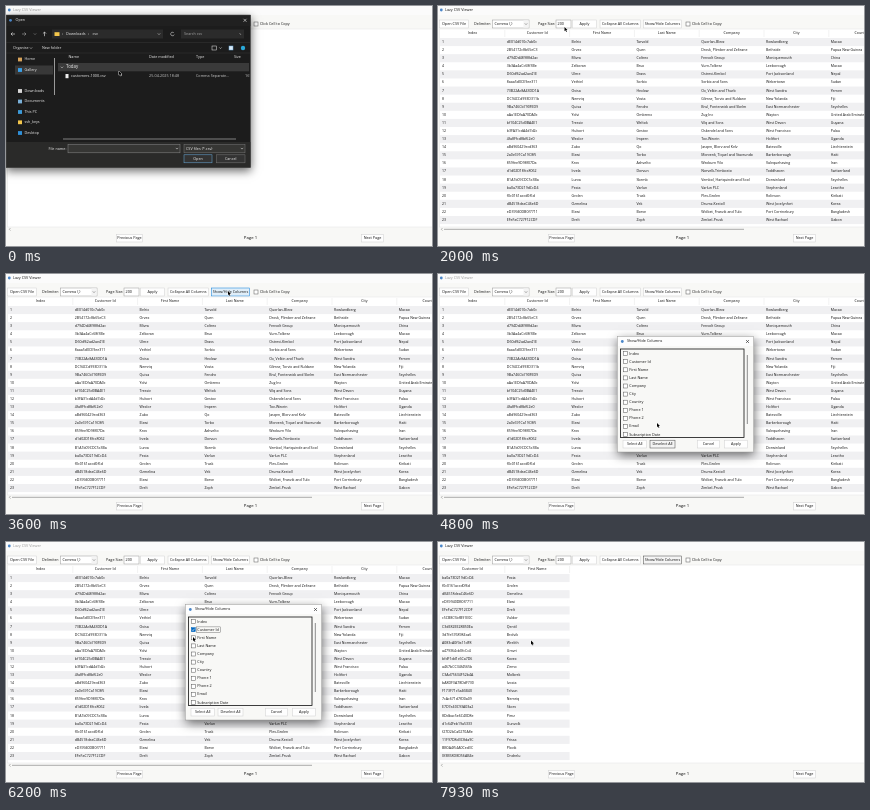
An HTML page with a canvas that plays this animation: 426 px wide and 240 px high, repeating every 8 s.

```html
<!DOCTYPE html>
<html lang="en">
<head>
<meta charset="utf-8">
<title>Lazy CSV Viewer</title>
<style>
html, body { margin: 0; width: 100%; height: 100%; overflow: hidden; background: #fff; }
canvas { display: block; width: 426px; height: 240px; }
</style>
</head>
<body>
<canvas id="stage"></canvas>
<script>
const W = 426, H = 240, LOOP = 8000, STEP = 200 / 3;
const canvas = document.getElementById('stage');
const ctx = canvas.getContext('2d');
const dpr = window.devicePixelRatio || 1;
canvas.width = W * dpr;
canvas.height = H * dpr;

const BLUE = '#0078d7', LINE = '#cfcfcf', WINDOW = '#f8f8f6', STRIPE = '#f0f0f2';
const ROW = 8.09, VISIBLE = 23;

// ---- data ----
const HEAD = ['Index', 'Customer Id', 'First Name', 'Last Name', 'Company', 'City', 'Country',
  'Phone 1', 'Phone 2', 'Email', 'Subscription Date', 'Website'];

const IDS = `dE014d010c7ab0c 2B54172c8b65eC3 d794Dd48988d2ac 3b3Aa4aCc68f3Be D60df62ad2ae41E
8aaa5d0CE9ee311 73B22Ac8A43DD1A DC94CCd993D311b 9Ba746Cb790FED9 aAa1EDfaA70DA0c bf104C25d0BA4E1
b3FA31cdA4d7d2c 4fa8Ffcd8bf62e0 aBd960429ecd363 2a0c691Ca19C8f5 859fee9D98f07Da d1d02D18fcc8062
B1A1b09CDC5c3Ba ba0a73D219dCcD4 f0c0161accd0f6d dB4518deaC46e6D eD39940DB0f7711 EFeFaC727F12CDF
c5CB8C5bfB91E0C C3dE82EE28B50Ea 3d7fe5768984ca6 A083cA0f9a11dF8 a479364cb0fcCc4 bfdF1dd1c6Ca7D6
a467bCC34f4565b C3Ad75634F52b4A bA8DF3A78DdF730 F173F71c5a46B40 7cAc671d7fD0a09 E7D7e40C93A03a2
8Ddbac5e6C40D8e d1c64Feb19a5333 f27D2bCa0270A8e 11F97D8d3C8da9C BB0A4f54A0Ced3C 0f3B58D8D56AB4e`.split(/\s+/);

const FIRST = `Belrix Orvex Mivra Zelkoran Ulme Vethiel Ovisa Nemriq Quisa Yolvi Tressiv Hulvort Wexlor
Zubo Elzwi Krov Irzela Lurva Pexia Grolen Ozmelina Elzwi Drelt Vuldor Qentil Brolvik Wrelith Umvri
Kovex Zirmo Molbrek Ivoxia Telvun Nemriq Skorv Pimz Gunvolk Uvo Yrissa Plovik Ondrelu`.split(/\s+/);

const LAST = `Tarvold Quen Coltrex Brux Dravs Sorbix Hexlow Vosta Fendro Ombrenx Weltok Gestov Impern
Qo Torbo Ashvelto Dorvun Skemb Varlun Trusk Vek Borve Zoph`.split(/\s+/);

const PLACES = `Quorlan-Blevz|Rowlandberg|Macao
Drosk, Plimber and Zeltrane|Bethside|Papua New Guinea
Fenvolt Group|Moniquemouth|China
Vurn-Tolbrez|Leeborough|Macao
Ostrevi-Kimbol|Port Jacksonland|Nepal
Sorbix and Sons|Webertown|Sudan
Ox, Velkin and Thurb|West Sandra|Yemen
Glimse, Torvix and Ruldane|New Yolanda|Fiji
Brul, Ponterwick and Skelm|East Normanchester|Seychelles
Zug Inc|Wayton|United Arab Emirates
Vilq and Sons|West Devon|Guyana
Oskendel and Sons|West Francisco|Palau
Tov-Wexrin|Holtfort|Uganda
Jasqen, Blorv and Kelv|Batesville|Liechtenstein
Morvenk, Tiquel and Stavrundo|Barkerborough|Haiti
Wexburn Yilo|Valequehaving|Iran
Norvelk-Trimbosto|Toddhaven|Switzerland
Vembol, Hartquinde and Sool|Dorwinland|Seychelles
Varlun PLC|Stephenland|Lesotho
Plev-Grolen|Rolinson|Kiribati
Drumz-Kestoll|West Jocelynfort|Korea
Wolbet, Franzik and Tulo|Port Corrinebury|Bangladesh
Zimbel-Prusk|West Rachael|Gabon`.split('\n').map(line => line.split('|'));

const pad = n => String(n).padStart(2, '0');
const phone = k => ['555-555-01', '(555)555-01', '001-555-555-01', '+1-555-555-01'][k * 7 % 4]
  + pad(k * 37 % 100) + (k % 3 ? 'x' + (k * 467 % 9000 + 100) : '');

const ROWS = IDS.map((id, i) => {
  const last = LAST[i] || 'Vek';
  const place = PLACES[i % PLACES.length];
  return [String(i + 1), id, FIRST[i], last, ...place, phone(i + 1), phone(i * 5 + 2),
    `${last.toLowerCase()}${i * 13 % 90}@mail.example`,
    `202${i * 3 % 5 % 3}-${pad(i * 7 % 12 + 1)}-${pad(i * 11 % 28 + 1)}`,
    `http://www.${place[0].toLowerCase().replace(/[^a-z]/g, '')}.example/`];
});

// ---- drawing helpers ----
function text(str, x, y, { size = 3.75, color = '#111', align = 'left' } = {}) {
  // Laid out at ten times the size so glyph advances stay fractional.
  ctx.save();
  ctx.translate(x, y);
  ctx.scale(size / 40, size / 40);
  ctx.font = '40px "Open Sans", "Noto Sans", sans-serif';
  ctx.textAlign = align;
  ctx.textBaseline = 'middle';
  ctx.fillStyle = color;
  ctx.fillText(str, 0, 0);
  ctx.restore();
}

function box(x, y, w, h, fill, stroke, lineWidth = 0.5) {
  if (fill) { ctx.fillStyle = fill; ctx.fillRect(x, y, w, h); }
  if (stroke) { ctx.strokeStyle = stroke; ctx.lineWidth = lineWidth; ctx.strokeRect(x, y, w, h); }
}

function path(points, color, lineWidth = 0.6) {
  ctx.beginPath();
  points.forEach(([x, y]) => ctx.lineTo(x, y));
  ctx.strokeStyle = color;
  ctx.lineWidth = lineWidth;
  ctx.stroke();
}

function dot(x, y, r, color) {
  ctx.fillStyle = color;
  ctx.beginPath();
  ctx.arc(x, y, r, 0, 7);
  ctx.fill();
}

function clipped(x, y, w, h, draw) {
  ctx.save();
  ctx.beginPath();
  ctx.rect(x, y, w, h);
  ctx.clip();
  draw();
  ctx.restore();
}

function shadowed(x, y, w, h, fill, blur) {
  ctx.save();
  ctx.shadowColor = 'rgba(0,0,0,.6)';
  ctx.shadowBlur = blur * dpr;
  ctx.shadowOffsetY = 3 * dpr;
  box(x, y, w, h, fill);
  ctx.restore();
}

function button(label, x, y, w, h, state) {
  const [fill, stroke] = { hover: ['#e0eef9', BLUE], focus: ['#f4f4f4', '#444'] }[state] || ['#fefefe', LINE];
  box(x, y, w, h, fill, stroke);
  text(label, x + w / 2, y + h / 2, { align: 'center' });
}

function checkbox(x, y, checked) {
  box(x - 2, y - 2, 4, 4, checked ? '#0067c0' : '#fff', checked ? '#0067c0' : '#555');
  if (checked) path([[x - 1.2, y], [x - 0.3, y + 1], [x + 1.3, y - 1]], '#fff');
}

const cross = (x, y, color) => {
  path([[x - 1.5, y - 1.5], [x + 1.5, y + 1.5]], color);
  path([[x - 1.5, y + 1.5], [x + 1.5, y - 1.5]], color);
};
const chevron = (x, y, color) => path([[x - 1.2, y - 0.6], [x, y + 0.6], [x + 1.2, y - 0.6]], color, 0.5);

// ---- main window ----
function mainWindow(t, active) {
  box(0, 0, W, H, WINDOW);
  box(0, 0, W, 9, '#fbfbfb');
  dot(3.3, 4, 1.4, '#4a86c8');
  text('Lazy CSV Viewer', 7, 4, { color: active ? '#111' : '#999' });

  const collapsed = t >= 2300 && t < 2930;
  const tab = t >= 1150 && t < 1800;
  button('Open CSV File', 1.5, 14, 29, 8);
  text('Delimiter:', 36, 18);
  box(54.5, 14, 36.5, 8, '#fff', tab ? BLUE : '#999');
  text(t < 700 || t >= 1800 ? 'Comma (,)' : 'Tab (\\t)', 56.5, 18);
  box(85.5, 14.3, 5.2, 7.4, tab ? '#cce4f7' : '#f4f4f4');
  chevron(88, 18, '#444');
  text('Page Size:', 100, 18);
  box(118, 14, 15, 8, '#fff', '#999');
  text('200', 119.5, 18);
  button('Apply', 134.5, 14, 24, 8);
  button((collapsed ? 'Expand' : 'Collapse') + ' All Columns', 162, 14, 40.5, 8,
    t > 2170 && t < 3080 ? 'hover' : '');
  button('Show/Hide Columns', 205.5, 14, 38, 8, t > 3230 && t < 3700 ? 'hover' : t >= 7030 ? 'focus' : '');
  checkbox(250, 18, false);
  text('Click Cell to Copy', 254, 18);

  box(1.5, 23, W, 198, '#fff', '#e2e2e2');
  if (t >= 700) {
    if (t < 1800) table([HEAD.join(',')], ROWS.map(r => [r.join(',')]), 64.7, 0);
    else if (t < 7030) table(HEAD, ROWS, collapsed ? 32.4 : 64.8, 0);
    else {
      const scroll = Math.floor(18 * Math.min(1, Math.max(0, (t - 7430) / 430)));
      table(HEAD.slice(1, 3), ROWS.map(r => r.slice(1, 3)), 64.8, scroll);
    }
  }

  path([[4.5, 222], [3.3, 223.3], [4.5, 224.6]], '#777', 0.5);
  if (t >= 1800 && t < 7030 && !collapsed) path([[6, 223.3], [306, 223.3]], '#999', 0.8);
  button('Previous Page', 110.5, 228.5, 26, 7.5);
  text('Page 1', 244.5, 232, { size: 4.3, align: 'center' });
  button('Next Page', 355.5, 228.5, 22, 7.5);
}

function table(head, rows, width, scroll) {
  const left = 2, top = 32;
  const total = head.length * width;
  for (let i = 0; i < VISIBLE; i++) {
    if ((i + scroll) % 2 === 0) box(left, top + i * ROW, total, ROW, STRIPE);
  }
  head.forEach((title, c) => {
    const x = left + c * width;
    if (x > W) return;
    clipped(x, 23, width - 0.5, 198, () => {
      const single = head.length === 1;
      text(title, single ? x + 1 : x + width / 2, 27.5, { size: 3.65, align: single ? 'left' : 'center' });
      for (let i = 0; i < VISIBLE; i++) {
        text(rows[i + scroll][c], x + (single ? 1 : 2), top + (i + 0.5) * ROW, { size: 3.55 });
      }
    });
    path([[x + width, 24], [x + width, 31]], '#e4e4e4', 0.5);
  });
}

function delimiterList(t) {
  const picked = t < 1650 ? 1 : 0;
  box(54.5, 21.5, 36.5, 26.8, '#fff', '#666');
  ['Comma (,)', 'Tab (\\t)', 'Semicolon (;)', 'Pipe (|)', 'Space ( )'].forEach((label, i) => {
    const y = 24.3 + i * 5.25;
    if (i === picked) box(55, y - 2.6, 35.6, 5.2, BLUE);
    text(label, 56, y, { color: i === picked ? '#fff' : '#111' });
  });
}

// ---- dialogs ----
function fileDialog() {
  const light = '#f0f0f0', dim = '#a5a5a5', edge = '#4a4a4a';
  const label = (str, x, y, color = light) => text(str, x, y, { color });
  shadowed(0, 9, 244.5, 152.5, '#1c1c1c', 9);
  box(0, 9, 244.5, 11, '#202020');
  dot(4.5, 14.3, 1.4, '#4a86c8');
  label('Open', 9.5, 14.3);
  cross(239, 14.3, light);

  path([[9, 28], [5, 28]], light);
  path([[6.6, 26.4], [5, 28], [6.6, 29.6]], light);
  path([[16, 28], [20, 28]], dim);
  path([[18.4, 26.4], [20, 28], [18.4, 29.6]], dim);
  chevron(29, 28, dim);
  path([[38.5, 30.2], [38.5, 26]], light);
  path([[36.9, 27.6], [38.5, 26], [40.1, 27.6]], light);
  box(46, 23.5, 111, 9, '#2b2b2b');
  box(48.5, 26.2, 5, 3.8, '#f3c64b');
  label('›', 56, 28);
  label('Downloads', 60, 28);
  label('›', 82, 28);
  label('csv', 86.5, 28);
  chevron(153, 28, light);
  ctx.beginPath();
  ctx.arc(166.5, 28, 1.8, 0.3, 5.6);
  ctx.strokeStyle = light;
  ctx.stroke();
  box(175, 23.5, 63, 9, '#2b2b2b');
  label('Search csv', 178, 28, dim);
  path([[233.5, 27], [235, 29]], dim);

  path([[0, 36.5], [244, 36.5]], '#363636', 0.5);
  label('Organise', 7, 42);
  chevron(25, 42, light);
  label('New folder', 36, 42);
  box(206, 40, 4.5, 4, null, light);
  chevron(214.5, 42, light);
  box(223, 40, 4, 4, '#d8e8f4', '#6aa6d8');
  dot(237, 42, 2.2, '#2aa8d8');
  path([[0, 47], [244, 47]], '#363636', 0.5);

  box(9, 59.5, 38, 9, '#383838');
  [['Home', 53.5, '#d8a35a'], ['Gallery', 64, '#3aa0e8'], ['Downloads', 85, '#d8d8d8'],
    ['Documents', 95.5, '#7ab0d8'], ['This PC', 106, '#3c9ad8'], ['ssh_keys', 116.3, '#f3c64b'],
    ['Desktop', 127, '#2f8fd8']].forEach(([name, y, color]) => {
    box(12, y - 1.9, 4, 3.8, color);
    label(name, 18.5, y);
  });
  box(48, 52, 1, 37, '#9a9a9a');

  [['Name', 62.5], ['Date modified', 143], ['Type', 190], ['Size', 228]].forEach(([name, x]) => label(name, x, 51.3));
  box(52, 57, 191, 8.3, '#3a3a3a');
  chevron(56, 61.3, light);
  text('Today', 60, 61.3, { size: 4.4, color: light });
  box(59.5, 68, 3, 4.2, '#eee');
  label('customers-1000.csv', 65, 70.3);
  label('25-04-2025 18:48', 143, 70.3, '#ccc');
  label('Comma Separate...', 190, 70.3, '#ccc');
  clipped(236, 66, 7.5, 9, () => label('169 KB', 239, 70.3, '#ccc'));
  path([[57, 133], [230, 133]], '#9a9a9a', 0.8);

  box(0, 136, 244.5, 25.5, '#2a2a29');
  label('File name:', 42.5, 142.6);
  box(62, 138.3, 112, 8.5, '#363634', '#8a8a8a');
  chevron(171, 142.5, light);
  box(178, 138.3, 61, 8.5, '#363634', '#777');
  label('CSV files (*.csv)', 180, 142.6);
  chevron(236, 142.5, light);
  box(178, 148.8, 28, 8, '#333', '#6aaee0');
  text('Open', 192, 152.8, { color: light, align: 'center' });
  box(210.5, 148.8, 28.5, 8, '#333', '#777');
  text('Cancel', 224.7, 152.8, { color: light, align: 'center' });
  box(0.2, 9, 244.3, 152.5, null, edge);
}

function columnPicker(t) {
  const isChecked = i => t < 4430 || (i === 1 && t >= 5800) || (i === 2 && t >= 6330);
  const focused = t < 5800 ? -1 : t < 6330 ? 1 : 2;
  shadowed(179.5, 62.5, 136, 115.5, WINDOW, 10);
  box(179.5, 62.5, 136, 115.5, WINDOW, '#999');
  box(180, 63, 135, 9, '#fdfdfd');
  dot(184.3, 67.5, 1.4, '#4a86c8');
  text('Show/Hide Columns', 189, 67.5);
  cross(309.5, 67.5, '#222');

  box(182.5, 75, 123.5, 88.5, WINDOW, '#111', 0.8);
  HEAD.slice(0, 11).forEach((name, i) => {
    const y = 79.6 + i * 8.1;
    checkbox(187.3, y, isChecked(i));
    if (i === focused) box(190.5, y - 2.8, 24, 5.6, null, '#555', 0.4);
    text(name, 191.3, y);
  });
  box(308.8, 81, 1, 69, '#8a8a8a');
  button('Select All', 185, 166.2, 23.5, 7.8);
  button('Deselect All', 212, 166.2, 25, 7.8, t > 4200 && t < 5800 ? 'focus' : '');
  button('Cancel', 259.5, 166.2, 22, 7.8);
  button('Apply', 286.5, 166.2, 23, 7.8, t > 6850 ? 'hover' : '');
}

// ---- pointer: time, x, y ----
const MOVES = [[0, 113, 65], [300, 95, 70], [700, 95, 70], [1100, 86, 18], [1270, 80, 19], [1650, 70, 24],
  [1800, 70, 24], [2200, 183, 18], [2600, 186, 19], [2950, 186, 19], [3300, 222, 17], [3700, 222, 17],
  [4250, 224, 169], [4500, 224, 169], [4800, 219, 149], [5600, 187, 87], [5900, 187, 87], [6200, 187, 95],
  [6450, 187, 95], [6900, 298, 169], [7060, 298, 169], [7450, 93, 98.5], [8000, 93, 98.5]];

function pointer(t) {
  const i = MOVES.findIndex(([time]) => time > t);
  const [t0, x0, y0] = MOVES[i - 1], [t1, x1, y1] = MOVES[i];
  const p = (t - t0) / (t1 - t0), e = p * p * (3 - 2 * p);
  ctx.save();
  ctx.translate(x0 + (x1 - x0) * e, y0 + (y1 - y0) * e);
  ctx.beginPath();
  [[0, 0], [0, 4.2], [1, 3.3], [1.7, 4.9], [2.4, 4.6], [1.7, 3.1], [3, 3]].forEach(([x, y]) => ctx.lineTo(x, y));
  ctx.closePath();
  ctx.strokeStyle = '#fff';
  ctx.lineWidth = 0.8;
  ctx.stroke();
  ctx.fillStyle = '#000';
  ctx.fill();
  ctx.restore();
}

function draw(t) {
  const opening = t < 700, picking = t >= 3720 && t < 7030;
  ctx.setTransform(dpr, 0, 0, dpr, 0, 0);
  mainWindow(t, !opening && !picking);
  if (t >= 1150 && t < 1800) delimiterList(t);
  if (opening) fileDialog();
  if (picking) columnPicker(t);
  pointer(t);
}

const start = performance.now();
function frame() {
  const t = (performance.now() - start) % LOOP;
  draw(Math.floor(t / STEP) * STEP);
  requestAnimationFrame(frame);
}
frame();
</script>
</body>
</html>
```
